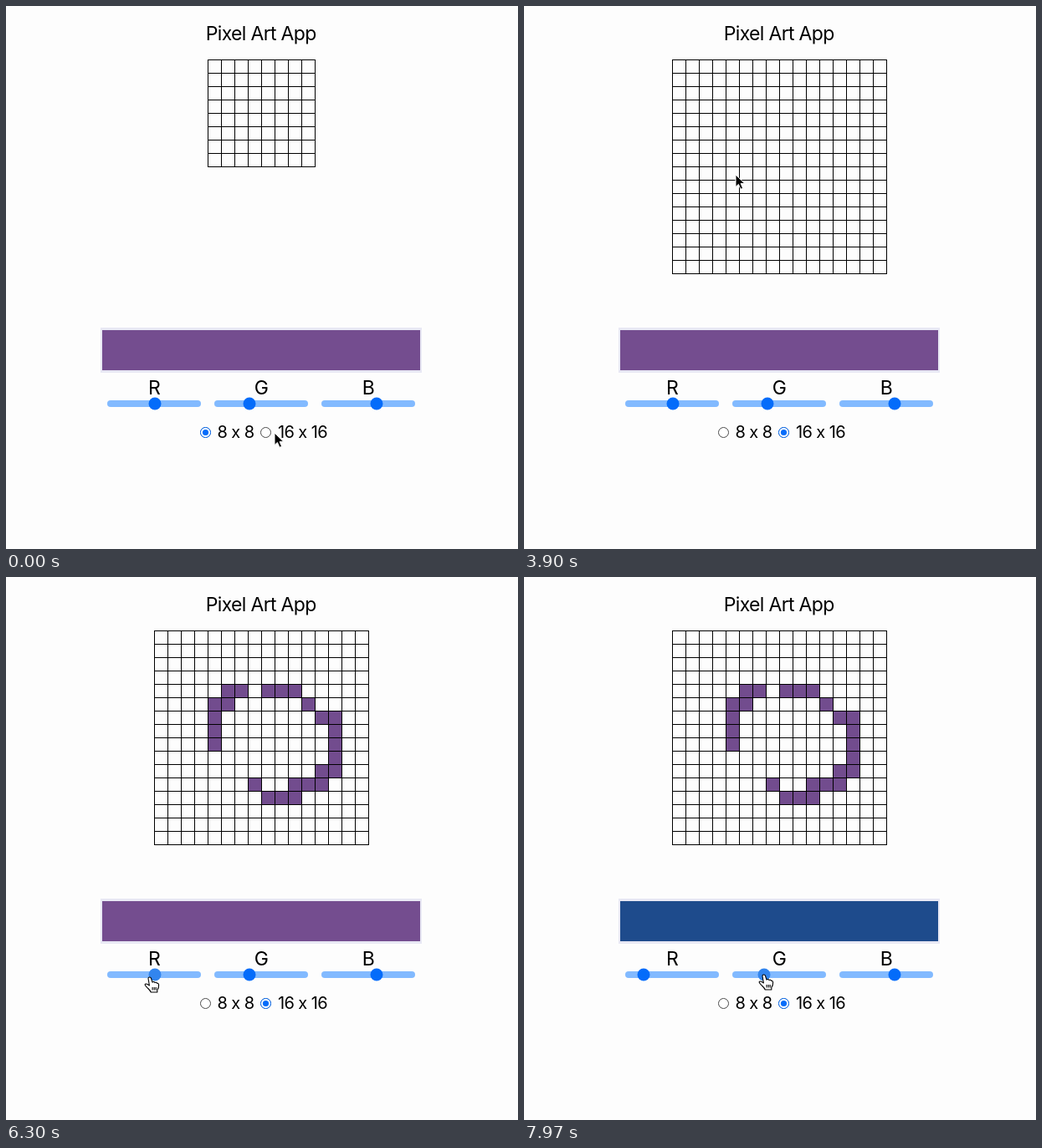
Animation of 612 by 650 pixels, one loop 8 s. Source, as an HTML page:

```html
<!DOCTYPE html>
<html lang="en">
<head>
<meta charset="utf-8">
<title>Pixel Art App</title>
<style>
html, body { margin: 0; width: 100%; height: 100%; overflow: hidden; background: #fdfdfd; }
svg { display: block; width: 612px; height: 650px; }
text { font: 23px Inter, "Open Sans", sans-serif; letter-spacing: -.03em; text-anchor: middle; }
.option { font-size: 20px; text-anchor: start; }
.lines { fill: none; stroke: #000; shape-rendering: crispEdges; }
.track { stroke: #82baff; stroke-width: 8; stroke-linecap: round; }
.thumb { fill: #046cfa; }
.ring { fill: #fff; stroke: #4a4a4a; }
.on .ring { stroke: #046cfa; }
.dot { fill: #046cfa; }

.small, .big, .arrow, .hand, .cell { animation: 8s step-end infinite; }
.small { animation-name: small; }
.big { animation-name: big; }
.arrow { animation-name: arrow; }
.hand { animation-name: hand; }
#cursor { animation: move 8s linear infinite; }
#swatch { animation: mix 8s linear infinite; }
#R { animation: slideR 8s linear infinite, hoverR 8s step-end infinite; }
#G { animation: slideG 8s linear infinite, hoverG 8s step-end infinite; }

@keyframes small {
  0%, 18.75% { visibility: visible; }
  6.25%, 35.6% { visibility: hidden; }
  100% { visibility: hidden; }
}
@keyframes big {
  0%, 18.75% { visibility: hidden; }
  6.25%, 35.6% { visibility: visible; }
  100% { visibility: visible; }
}
@keyframes arrow { 0% { visibility: visible; } 72.3%, 100% { visibility: hidden; } }
@keyframes hand { 0% { visibility: hidden; } 72.3%, 100% { visibility: visible; } }
@keyframes move {
  0% { transform: translate(320px, 511px); }
  4%, 10.5% { transform: translate(311px, 512px); }
  17%, 21% { transform: translate(240px, 512px); }
  26% { transform: translate(275px, 521px); }
  31% { transform: translate(309px, 513px); }
  32.875%, 38.5% { transform: translate(308px, 513px); }
  42% { transform: translate(285px, 400px); }
  46.5% { transform: translate(255px, 220px); }
  48.75% { transform: translate(252px, 202px); }
  50% { transform: translate(250px, 202px); }
  51.6% { transform: translate(250px, 154px); }
  52.4% { transform: translate(264px, 139px); }
  54% { transform: translate(313px, 135px); }
  54.8% { transform: translate(345px, 138px); }
  56% { transform: translate(392px, 168px); }
  57.6% { transform: translate(393px, 230px); }
  58.6% { transform: translate(365px, 247px); }
  59.4% { transform: translate(340px, 263px); }
  60% { transform: translate(313px, 260px); }
  60.6% { transform: translate(297px, 252px); }
  61.625% { transform: translate(287px, 273px); }
  65% { transform: translate(264px, 330px); }
  70% { transform: translate(188px, 455px); }
  73% { transform: translate(168px, 483px); }
  78.75%, 79.5% { transform: translate(172px, 479px); }
  83.75% { transform: translate(144px, 479px); }
  87.5% { transform: translate(142px, 479px); }
  93.5%, 96.5% { transform: translate(291px, 477px); }
  99.625%, 100% { transform: translate(287px, 476px); }
}
@keyframes slideR {
  0%, 79.5% { transform: translateX(178px); }
  83.75% { transform: translateX(145px); }
  87.5%, 100% { transform: translateX(143px); }
}
@keyframes slideG {
  0%, 96.5% { transform: translateX(291px); }
  99.625%, 100% { transform: translateX(287px); }
}
@keyframes hoverR { 0% { fill: #046cfa; } 72.3% { fill: #3285ee; } 89%, 100% { fill: #046cfa; } }
@keyframes hoverG { 0% { fill: #046cfa; } 92%, 100% { fill: #3285ee; } }
@keyframes mix {
  0%, 79.5% { fill: #744d8f; }
  83.75% { fill: #214e8e; }
  87.5%, 96.5% { fill: #1e4e8e; }
  99.625%, 100% { fill: #1e4b8c; }
}
</style>
</head>
<body>
<svg viewBox="0 0 612 650">
  <text x="304.7" y="41">Pixel Art App</text>
  <path class="lines small" id="grid8"/>
  <g class="big">
    <path class="lines" id="grid16"/>
  </g>
  <g id="cells"></g>

  <rect x="113" y="385" width="384" height="54" fill="#e8e8f4"/>
  <rect id="swatch" x="115" y="388" width="380" height="48"/>

  <g id="sliders"></g>

  <g id="radios"></g>
  <text class="option" x="252.5" y="517">8 x 8</text>
  <text class="option" x="325" y="517">16 x 16</text>

  <g id="cursor">
    <path class="arrow" d="M1 0V14.5L4.4 11.4L7 17.3L9.6 16.2L7.1 10.4H11.8Z" stroke="#fff"/>
    <path class="hand" d="M-2 1.5C-2-.5 1-.5 1.5 1.5L3 6.2C4 5 5.5 5.4 5.9 6.6C7 5.8 8.2 6.4 8.5 7.4C9.8 7 10.5 8 10.6 9.5C10.8 12 9.8 14 8.8 15.5V18H1.2C.5 15.8-1.5 14.3-3.4 12.4C-5.5 10.2-6.5 9-5.5 8.2C-4.4 7.4-2.5 8.5-.6 10Z M3.1 12V15.5 M5.2 12V15.5 M7.2 12V15.5"
      fill="#fff" stroke="#000" stroke-width="1.1" stroke-linejoin="round"/>
  </g>
</svg>
<script>
const $ = id => document.getElementById(id);
const CELL = 16, TOP = 64, LEFT = 177;

function gridPath(count, left) {
  const size = count * CELL;
  let path = "";
  for (let i = 0; i <= count; i++) {
    const step = i * CELL + 0.5;
    path += `M${left + step} ${TOP}v${size + 1}M${left} ${TOP + step}h${size + 1}`;
  }
  return path;
}
$("grid8").setAttribute("d", gridPath(8, 241));
$("grid16").setAttribute("d", gridPath(16, LEFT));

// Column and row of each cell in the order the stroke paints them.
const stroke = "4,8 4,7 4,6 4,5 5,5 5,4 6,4 8,4 9,4 10,4 11,5 12,6 13,6 13,7 13,8 13,9 13,10 12,10 12,11 11,11 10,11 10,12 9,12 8,12 7,11";
let rules = "";
$("cells").innerHTML = stroke.split(" ").map((cell, i) => {
  const [col, row] = cell.split(",");
  const start = 50.1 + i * 0.435;
  rules += `@keyframes paint${i} { 0% { visibility: hidden } ${start}%, 100% { visibility: visible } }`;
  return `<rect class="cell" x="${LEFT + 1 + col * CELL}" y="${TOP + 1 + row * CELL}" width="15" height="15"
    fill="#724c8e" style="animation-name: paint${i}"/>`;
}).join("");
const sheet = document.createElement("style");
sheet.textContent = rules;
document.head.append(sheet);

$("sliders").innerHTML = [["R", 177, 178], ["G", 305, 291], ["B", 433, 443]].map(([name, x, value]) =>
  `<text x="${x}" y="465">${name}</text>
   <path class="track" d="M${x - 52} 476h104"/>
   <circle class="thumb" id="${name}" cy="476" r="7.5" style="transform: translateX(${value}px)"/>`
).join("");

$("radios").innerHTML = [[238.5, "small"], [310.5, "big"]].map(([x, state]) =>
  `<circle class="ring" cx="${x}" cy="510.5" r="6"/>
   <g class="on ${state}">
     <circle class="ring" cx="${x}" cy="510.5" r="6"/>
     <circle class="dot" cx="${x}" cy="510.5" r="3.6"/>
   </g>`
).join("");
</script>
</body>
</html>
```
